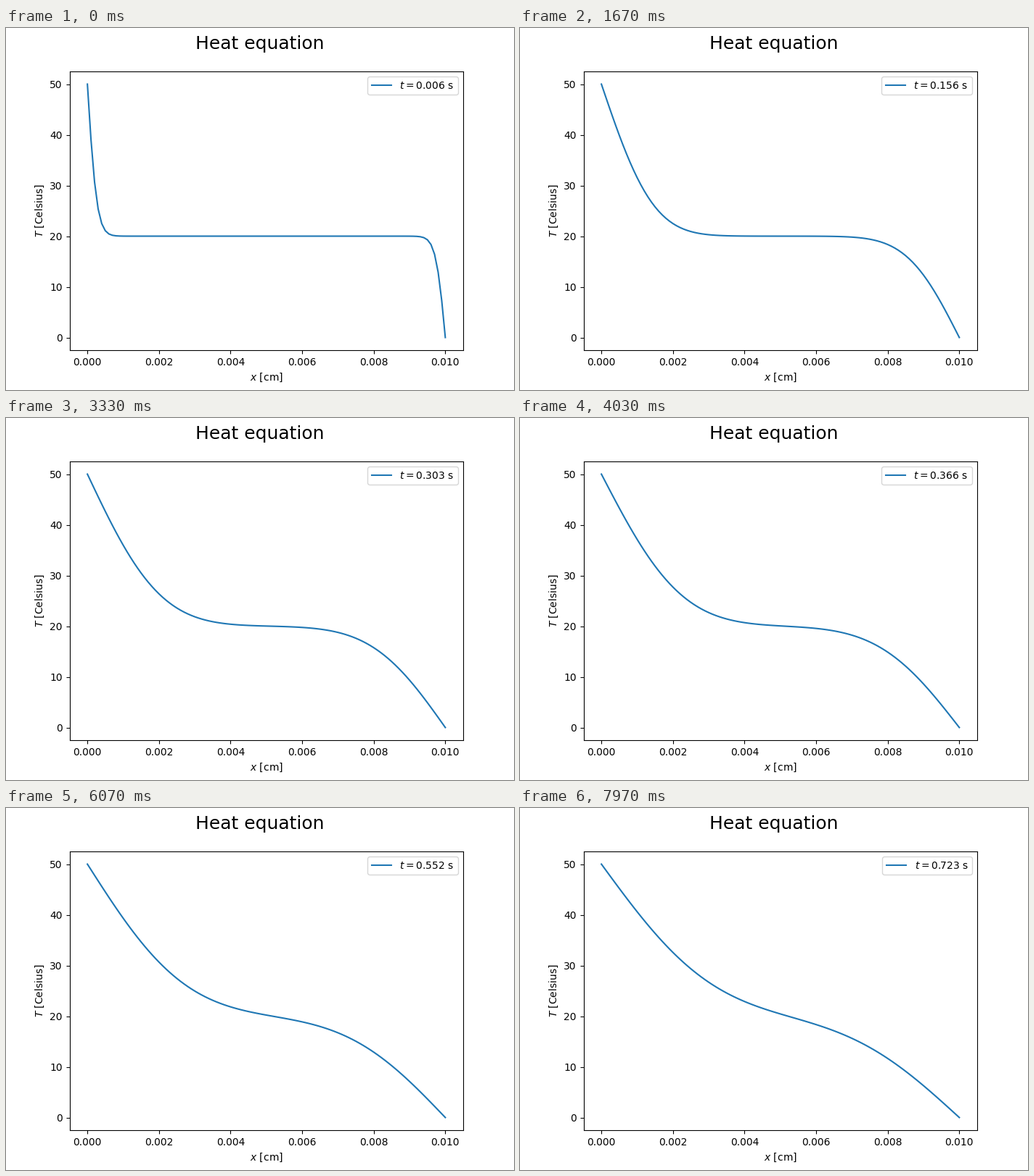
A matplotlib script that plays this animation: 700x500 px, repeating every 8 s.

```python
import numpy as np
import matplotlib.pyplot as plt
from matplotlib.animation import FuncAnimation

LENGTH = 0.01       # plate thickness
CELLS = 100
DIFFUSIVITY = 4.25e-6
DT = 1e-3
STEPS = 3           # time steps per frame
FRAMES = 240
START = 2           # frames already elapsed at the start
T_HOT, T_MID, T_COLD = 50.0, 20.0, 0.0


def implicit_step():
    """Matrix that advances the temperatures by one implicit Euler step."""
    r = DIFFUSIVITY * DT / (LENGTH / CELLS) ** 2
    a = np.eye(CELLS + 1)
    for i in range(1, CELLS):
        a[i, i - 1:i + 2] = -r, 1 + 2 * r, -r
    return np.linalg.inv(a)


def solve():
    """Temperature profile for every frame."""
    temp = np.full(CELLS + 1, T_MID)
    temp[0], temp[-1] = T_HOT, T_COLD
    advance = np.linalg.matrix_power(implicit_step(), STEPS)
    profiles = []
    for _ in range(START + FRAMES):
        profiles.append(temp)
        temp = advance @ temp
    return profiles[START:]


def label(i):
    return f"$t = {(START + i) * STEPS * DT:.3f}$ s"


x = np.linspace(0, LENGTH, CELLS + 1)
profiles = solve()

fig, ax = plt.subplots(figsize=(7, 5), dpi=100)
fig.suptitle("Heat equation", fontsize=18)
line, = ax.plot(x, profiles[0], label=label(0))
ax.set_xlabel("$x$ [cm]")
ax.set_ylabel("$T$ [Celsius]")
legend_text = ax.legend(loc="upper right").get_texts()[0]


def update(i):
    line.set_ydata(profiles[i])
    legend_text.set_text(label(i))
    return line, legend_text


anim = FuncAnimation(fig, update, frames=FRAMES, interval=1000 / 30,
                     repeat=True, repeat_delay=0)
plt.show()
```
